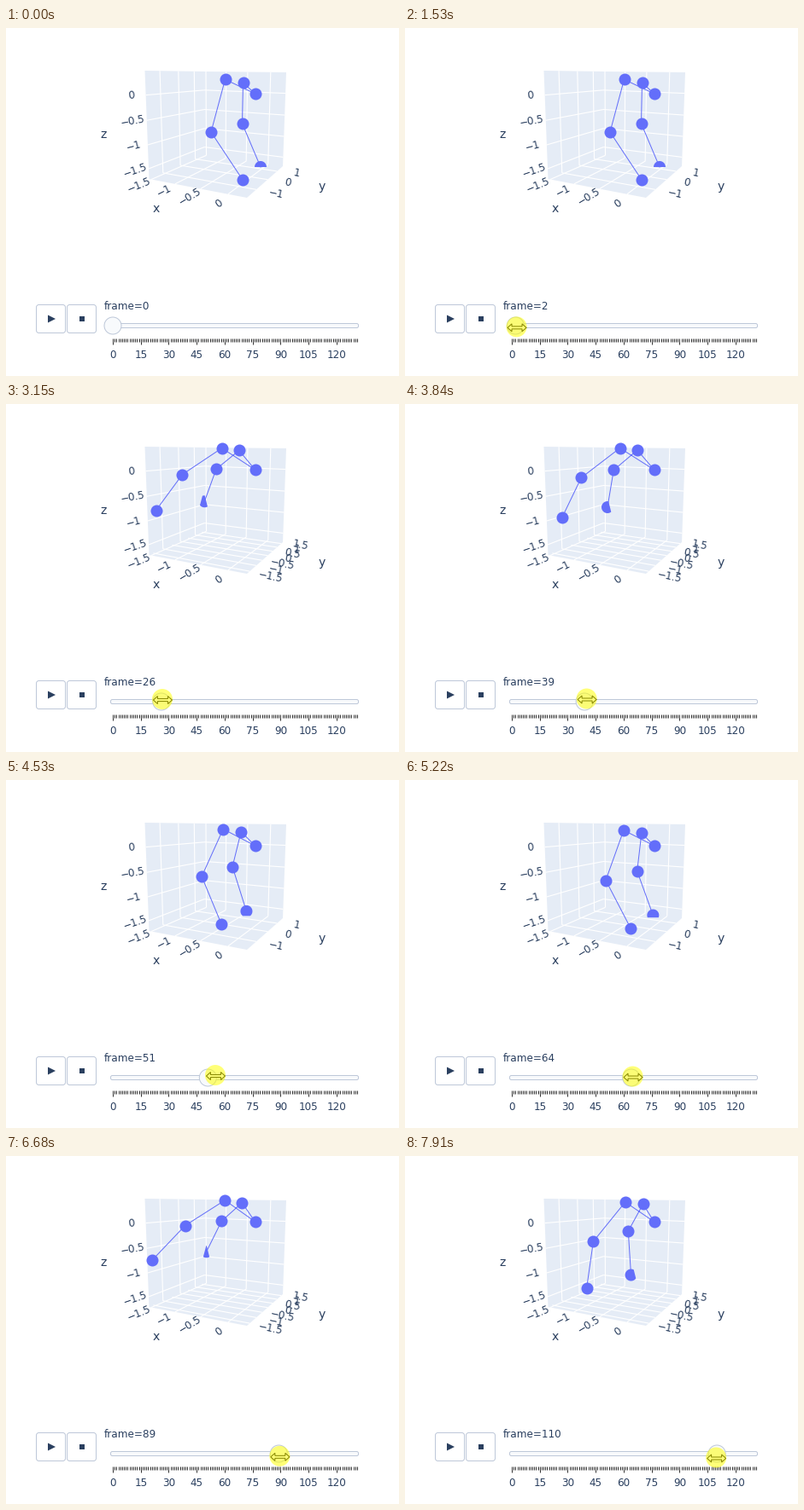
Animation of 460x408 px, one loop 7990 ms. Source, as a matplotlib script:

```python
import numpy as np
import matplotlib.pyplot as plt
from matplotlib.animation import FuncAnimation
from matplotlib.collections import LineCollection
from matplotlib.patches import Circle, FancyBboxPatch, Polygon

W, H, DPI = 460, 408, 64
PX = 72 / DPI                       # points per pixel
STEP, LOOP = 34, 7990
INK, BORDER, WALL, BLUE = "#2a3f5f", "#bec8d9", "#e5ecf6", "#636efa"

plt.rcParams["font.family"] = "DejaVu Sans"
fig = plt.figure(figsize=(W / DPI, H / DPI), dpi=DPI, facecolor="white")
ax = fig.add_axes([0, 0, 1, 1])
ax.set_xlim(0, W)
ax.set_ylim(H, 0)
ax.axis("off")


def label(x, y, s, size=12, rot=0, ha="center", va="center"):
    return ax.text(x, y, s, fontsize=size * PX, color=INK, rotation=rot,
                   ha=ha, va=va, zorder=3)


def shape(points, fill, z, edge="none"):
    return ax.add_patch(Polygon(points, fc=fill, ec=edge, lw=PX, zorder=z))


def box(x, y, w, h, r, fill):
    ax.add_patch(FancyBboxPatch((x, y), w, h, boxstyle=f"round,pad=0,rounding_size={r}",
                                fc=fill, ec=BORDER, lw=PX, zorder=4))


def cross(a, b):
    return a[0] * b[1] - a[1] * b[0]


def quad(*corners):
    """Perspective map from the unit square to four corners."""
    p0, p1, p2, p3 = (np.array(p, float) for p in corners)
    s, a, b = p0 - p1 + p2 - p3, p1 - p2, p3 - p2
    g, h = cross(s, b) / cross(a, b), cross(a, s) / cross(a, b)
    return lambda u, v: (((p1 - p0 + g * p1) * u + (p3 - p0 + h * p3) * v + p0)
                         / (g * u + h * v + 1))


# --- 3D box -----------------------------------------------------------------
A, B, C = (162.5, 50), (231.7, 51), (328, 52)
D, E, F, G = (324, 162), (282, 199), (167.5, 177), (232.3, 149)
left, back, floor = quad(F, G, B, A), quad(G, D, C, B), quad(F, E, D, G)
shape([A, B, C, D, E, F], WALL, 1)


def unit(vals, lo, hi):
    return [(v - lo) / (hi - lo) for v in vals]


def rows(face, vals):
    return [[face(0, v), face(1, v)] for v in vals]


def cols(face, vals):
    return [[face(u, 0), face(u, 1)] for u in vals]


def grid(lines):
    g = LineCollection(lines, colors="white", linewidths=1.15 * PX, zorder=2)
    ax.add_collection(g)
    return g


def axis_labels(vals, units, edge, off0, off1, rot0, rot1):
    """Tick labels beside an edge, offset and turn changing along it."""
    out = []
    for v, u in zip(vals, units):
        x, y = edge(u) + np.array(off0) * (1 - u) + np.array(off1) * u
        text = f"{v:g}".replace("-", "−")
        out.append(label(x, y, text, 12, rot0 + (rot1 - rot0) * u))
    return out


HALVES, WHOLE, BETWEEN = [-1.5, -1, -0.5, 0], [-1, 0, 1], [-1.5, -0.5, 0.5, 1.5]
xs, zs = unit(HALVES, -1.55, 0.32), unit(HALVES, -1.72, 0.47)
ys, ys_fine = unit(WHOLE, -1.7, 1.7), unit(BETWEEN, -1.7, 1.7)
grid(rows(left, zs) + rows(back, zs) + cols(back, xs) + cols(floor, xs))
grid(cols(left, ys) + rows(floor, ys))
axis_labels(HALVES, xs, lambda u: floor(u, 0), (-14, 7), (-10.5, 11.5), 22, 38)
axis_labels(HALVES, zs, lambda u: left(0, u), (-16, 2.7), (-17.7, -0.3), 21, 1)
y_style = (lambda u: floor(1, u), (24, 6.3), (22, 1.7), -12, -12)
axis_labels(WHOLE, ys, *y_style)
fine = [grid(rows(floor, ys_fine)), *axis_labels(BETWEEN, ys_fine, *y_style)]
label(175.5, 212.5, "x", 14)
label(370, 186, "y", 14)
label(114, 125, "z", 14)

# --- buttons and slider -----------------------------------------------------
for x in (35.5, 71.5):
    box(x, 324.5, 34, 33, 3, "white")
shape([(49, 336.5), (58, 341), (49, 345.5)], INK, 5)
shape([(86, 338), (92, 338), (92, 344), (86, 344)], INK, 5)
box(122.5, 346.5, 290, 5, 2, "#f8fafc")


def slot(k):
    return 125 + 2.183 * k


def tick(k):
    x = np.floor(slot(k) - 0.5) + 0.5
    return [(x, 364), (x, 368 if k % 15 else 371)]


ax.add_collection(LineCollection([tick(k) for k in range(132)], colors="#333333",
                                 linewidths=PX, zorder=4))
for k in range(0, 121, 15):
    label(slot(k), 387, str(k), va="baseline")
counter = label(114.5, 330, "", ha="left", va="baseline")
knob = ax.add_patch(Circle((slot(0), 349), 10, fc="#f8fafc", ec=BORDER, lw=PX, zorder=6))

# --- legs: hip, knee, ankle of the near side, then of the far side ----------
ROOT = (291.5, 77)
STAND = np.array([(256.5, 60.3), (240, 122), (277, 178),
                  (277.5, 64), (276.5, 112), (298, 163)])
BEND = np.array([(251.3, 53), (211.5, 95.7), (206, 148.7),
                 (272, 55.3), (247.7, 84), (251, 134)])
FOLD = np.array([(253.5, 52), (207.5, 81), (173, 120),
                 (273.5, 55), (248, 76.5), (231, 111)])
DRIFT = np.array([6, 5, -5, 6, 10, 6])
TURNS = [8, 30, 58, 93, 123]        # stand, fold, stand, fold, stand

bones, = ax.plot([], [], color=BLUE, lw=PX, zorder=3)
joints, = ax.plot([], [], "o", color=BLUE, ms=14 * PX, mew=0, zorder=4)
ankle = shape([ROOT] * 3, BLUE, 4)
angles = np.linspace(0, 2 * np.pi, 60)
RING = 7 * np.column_stack([np.cos(angles), np.sin(angles)])


def chord(pts, deg, d):
    """Flatten the part of pts lying beyond distance d in direction deg."""
    n = np.array([np.cos(np.radians(deg)), np.sin(np.radians(deg))])
    return pts - np.clip(pts @ n - d, 0, None)[:, None] * n


def draw_legs(k):
    s = (1 - np.cos(np.pi * np.interp(k, TURNS, range(5)))) / 2
    late = np.clip((k - 51) / 59, 0, 1) ** 1.5
    p = (1 - 2 * s) * (1 - s) * STAND + 4 * s * (1 - s) * BEND + s * (2 * s - 1) * FOLD
    p[:, 0] += late * DRIFT
    bones.set_data(*np.vstack([p[2::-1], [ROOT], p[3:]]).T)
    joints.set_data(*np.vstack([[ROOT], p[:5]]).T)

    # the floor and the walls cut into the far ankle
    wall = np.clip(5 * (s - 0.6) + 1.5 * late, 0, 1)
    corner = np.clip((s - 0.85) / 0.12, 0, 1)
    disc = chord(RING, 90, 0.6 * (163 - p[5, 1]))
    disc = chord(chord(disc, -14, 7 - 5 * wall), 195, 7 - 5 * corner)
    ankle.set_xy(disc + p[5])
    for art in fine:
        art.set_visible(wall > 0.3)


# --- mouse ------------------------------------------------------------------
ARROW = np.array([(0, 0), (0, 16), (3.8, 12.6), (6.4, 18.4), (8.6, 17.4),
                  (6.2, 11.8), (11.3, 11.5)])
half = [(-11, 0), (-6, -4.5), (-6, -1.5), (6, -1.5), (6, -4.5)]
RESIZE = np.array(half + [(-x, -y) for x, y in half])
mouse = shape(ARROW, "white", 7, "black")
glow = ax.add_patch(Circle((0, 0), 12, fc="#ffff00", ec="none", alpha=0.53, zorder=8))

DRAG_T = [1300, 2070, 2445, 2690, 3830, 5825, 7900]
DRAG_K = [0, 10, 19, 19, 39, 76, 110]


def hold(t, start, beat):
    return start + beat * np.floor((t - start) / beat)


def glide(t, t0, t1, a, b):
    f = np.clip((t - t0) / (t1 - t0), 0, 1)
    return np.array(a) * (1 - f) + np.array(b) * f


def drag_pos(t, k):
    lead = 8 * np.exp(-((t - 4400) / 600) ** 2)
    return slot(k) + lead - 0.5, 350.5 - 4 * np.cos(np.pi * (t - 3840) / 4070)


def update(i):
    t = (i + 1) * STEP
    beat = hold(t, 1300, 76.8)
    k = np.interp(beat, DRAG_T, DRAG_K)
    if t < 610:
        pos = glide(hold(t, 150, 77.5), 150, 460, (247, 397), (114.5, 361.5))
    elif t < 1300:
        pos = glide(hold(t, 610, 80), 610, 770, (121, 358), (123.5, 353))
    else:
        pos = np.array(drag_pos(beat, k))
    mouse.set_xy((ARROW if t < 610 else RESIZE) + pos)
    mouse.set_visible(t >= 150)
    glow.center = pos - (0.5, 1)
    glow.set_visible(t >= 1000)

    k = int(k)
    counter.set_text(f"frame={k}")
    knob.center = (slot(k), 349)
    draw_legs(k)
    return [bones, joints, ankle, mouse, glow, counter, knob, *fine]


anim = FuncAnimation(fig, update, frames=LOOP // STEP, interval=STEP,
                     init_func=lambda: update(0), repeat=True, repeat_delay=0,
                     blit=False)
plt.show()
```
